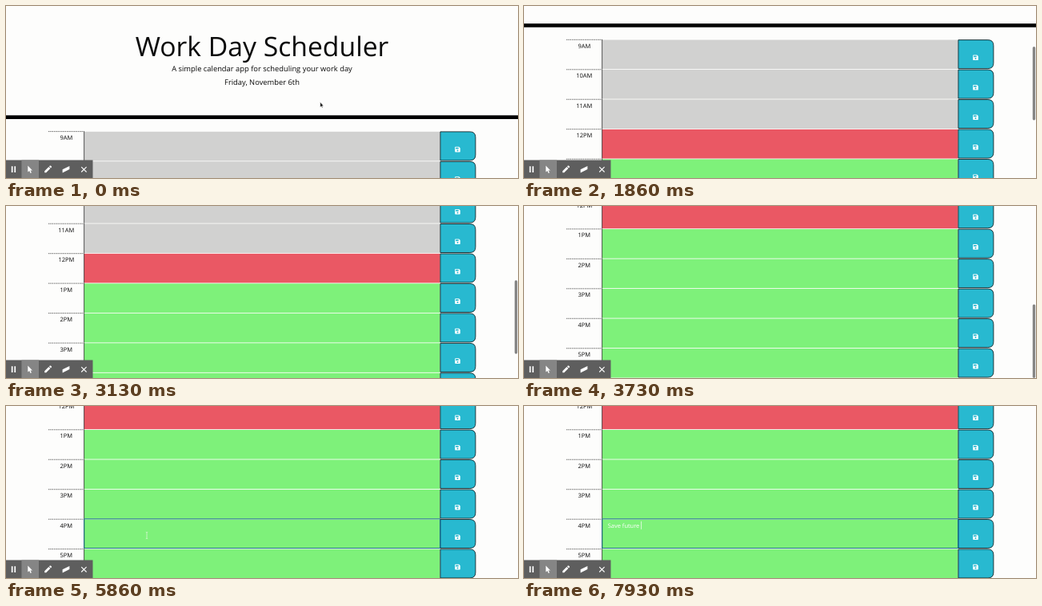
Animation of 640 by 216 pixels, one loop 8 s. Source, as an HTML page:

```html
<!DOCTYPE html>
<html lang="en">
<head>
<meta charset="utf-8">
<title>Work Day Scheduler</title>
<style>
html, body { margin: 0; width: 100%; height: 100%; overflow: hidden; background: #fdfdfc; }
svg { display: block; width: 640px; height: 216px; }
text { font-family: "Open Sans", sans-serif; font-size: 7.49px; fill: #0a0a0a; text-rendering: geometricPrecision; white-space: pre; }
.mid { text-anchor: middle; }
.lead { font-size: 9.37px; }
.title { font-size: 33.7px; }
</style>
</head>
<body>
<svg viewBox="0 0 640 216">
  <defs>
    <g id="save">
      <path fill="#fff" d="M-3.3 -2.6q0-.7.7-.7H1.7L3.3-1.7V2.6q0 .7-.7.7H-2.6q-.7 0-.7-.7z"/>
      <path fill="#28b9d0" d="M-2.4-2.4H1.2V-.6H-2.4z"/>
      <circle cy="1.3" r="1" fill="#28b9d0"/>
    </g>
  </defs>
  <g id="page">
    <text class="mid title" x="320" y="63">Work Day Scheduler</text>
    <text class="mid lead" x="320" y="81.6">A simple calendar app for scheduling your work day</text>
    <text class="mid lead" x="320" y="98.7">Friday, November 6th</text>
    <rect y="137.3" width="640" height="4.7"/>
    <g id="rows"></g>
    <g id="focus">
      <rect x="97.7" y="419.5" width="444.8" height="36.8" fill="none" stroke="#1c6f8c"/>
      <text id="note" x="104.7" y="430.5" style="fill:#fff"></text>
      <path id="caret" d="M0 422.5v10" stroke="#fff" stroke-width=".7"/>
    </g>
  </g>
  <rect id="thumb" x="635.8" width="3.4" height="92.5" rx="1.7" fill="#858585"/>
  <path id="arrow" d="M392.8 120.8v6.2l1.4-1.2.9 2 .9-.4-.9-1.9h1.8z" fill="#111" stroke="#fff" stroke-width=".4"/>
  <path id="beam" d="M-1.2-4.2Q0-4.2 0-3.2Q0-4.2 1.2-4.2M0-3.2V3.2M-1.2 4.2Q0 4.2 0 3.2Q0 4.2 1.2 4.2" fill="none" stroke="#e2f8df" stroke-width=".7"/>
  <g id="toolbar" fill="#fff">
    <rect y="193.5" width="108.5" height="22.5" fill="#5e5e5e"/>
    <rect x="19.5" y="193.5" width="21.5" height="22.5" fill="#858585"/>
    <path d="M6.8 201.2h1.7v7.8H6.8zM10.4 201.2h1.7v7.8h-1.7z"/>
    <path d="M27.3 200.5v8l1.9-1.6 1.4 3 1.3-.6-1.4-2.9h2.5z"/>
    <path d="M48.2 207.3l5.2-5.2 2 2-5.2 5.2h-2zM54 201.5l.9-.9q.5-.4 1 0l1 1q.4.5 0 1l-.9.9z"/>
    <path d="M70.6 205.2l8.8-4.3v4.2l-8.8 4.3z"/>
    <path d="M94.2 202.1l6.4 6.4M100.6 202.1l-6.4 6.4" stroke="#fff" stroke-width="1.1"/>
  </g>
</svg>
<script>
const $ = id => document.getElementById(id);
const LOOP = 8000, TOP = 157.3, PITCH = 37.47;
const NOTE = "Save future ";
const hours = ["9AM", "10AM", "11AM", "12PM", "1PM", "2PM", "3PM", "4PM", "5PM"];

$("rows").innerHTML = hours.map((hour, i) => {
  const y = TOP + i * PITCH;
  const fill = i < 3 ? "#d1d1d0" : i === 3 ? "#ea5864" : "#7ef17a";
  return `<path d="M53 ${y + .3}H97.5" stroke="#222" stroke-width=".7" stroke-dasharray="1.4 .9"/>
    <text class="mid" x="75.3" y="${y + 10.9}">${hour}</text>
    <rect x="97.5" y="${y + .5}" width="445" height="36.6" fill="${fill}"/>
    <path d="M97.6 ${y}v37.2" stroke="#333" stroke-width=".8"/>
    <path d="M542.9 ${y + .6}h37q7 0 7 7v22q0 7-7 7h-37z" fill="#28b9d0" stroke="#12262b" stroke-width=".9"/>
    <use href="#save" x="564.5" y="${y + 22.8}"/>`;
}).join("");

// [time, value] pairs, linear in between
const scrollKeys = [
  [330, 0], [600, 28], [860, 63.2], [1130, 97], [1460, 115.2],
  [1860, 115.2], [2130, 138], [2400, 172], [2660, 197], [2930, 210.2],
  [3130, 210.2], [3400, 246], [3730, 278.6], [3930, 277.7]
];
const pointerX = [[4060, 393], [5060, 176]];
const pointerY = [[4060, 124], [5060, 162.5]];

function track(keys, t) {
  if (t <= keys[0][0]) return keys[0][1];
  for (let i = 1; i < keys.length; i++) {
    const [t0, a] = keys[i - 1], [t1, b] = keys[i];
    if (t < t1) return a + (b - a) * (t - t0) / (t1 - t0);
  }
  return keys[keys.length - 1][1];
}

const show = (id, on) => $(id).setAttribute("visibility", on ? "inherit" : "hidden");

function draw(t) {
  const scroll = track(scrollKeys, t);
  $("page").setAttribute("transform", `translate(0 ${-scroll})`);
  $("thumb").setAttribute("y", scroll * .443);
  $("thumb").setAttribute("opacity", track([[330, 0], [400, 1], [4400, 1], [4860, 0]], t));

  show("arrow", t < 1160);
  show("beam", t >= 4060 && t < 6200);
  $("beam").setAttribute("transform", `translate(${track(pointerX, t)} ${track(pointerY, t)})`);

  show("focus", t >= 5130);
  const typed = t < 6200 ? 0 : Math.min(NOTE.length, 1 + Math.floor((t - 6200) / 150));
  $("note").textContent = NOTE.slice(0, typed);
  const width = typed ? $("note").getComputedTextLength() : 0;
  $("caret").setAttribute("transform", `translate(${105 + width} 0)`);
  show("caret", t >= 5130 && (t < 5660 || t >= 6200));
}

const start = performance.now();
function tick() {
  draw((performance.now() - start) % LOOP);
  requestAnimationFrame(tick);
}
tick();
</script>
</body>
</html>
```
